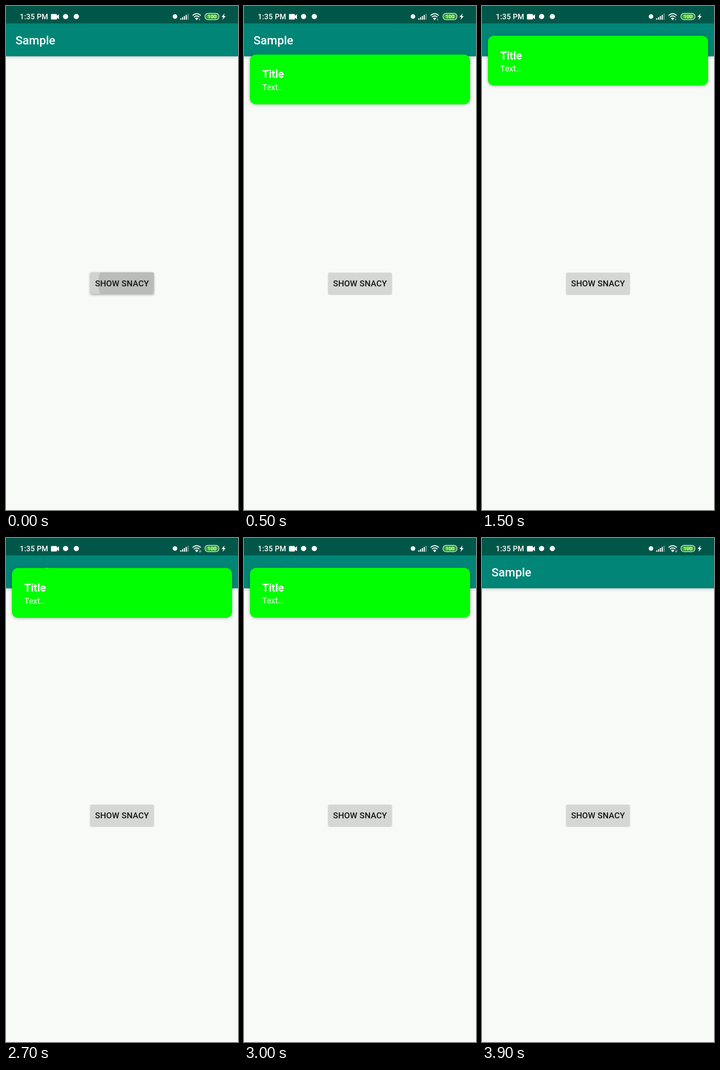
An HTML page for the animation above (5 s loop, 508 by 1102 pixels).

```html
<!DOCTYPE html>
<html lang="en">
<head>
<meta charset="utf-8">
<title>Snackbar sample</title>
<style>
  html, body { margin: 0; width: 100%; height: 100%; overflow: hidden; background: #f8faf7; }
  svg { display: block; width: 508px; height: 1102px; font-family: Roboto, sans-serif; }
  #bar { filter: drop-shadow(0 2px 3px rgba(0, 0, 0, .2)); }
  #card { filter: drop-shadow(0 1.5px 3px rgba(0, 0, 0, .3)); }
  .medium { font-weight: 500; }
</style>
</head>
<body>
<svg viewBox="0 0 508 1102">
  <defs>
    <clipPath id="face"><rect x="184.5" y="583" width="139" height="47" rx="2.5"/></clipPath>
  </defs>
  <rect width="508" height="1102" fill="#f8faf7"/>

  <g id="bar"><rect width="508" height="110" fill="#008577"/></g>
  <rect width="508" height="38" fill="#005749"/>
  <text class="medium" x="20.7" y="84" font-size="25.9" fill="#fff">Sample</text>

  <g id="button">
    <rect id="plate" x="184.5" y="583" width="139" height="47" rx="2.5" fill="#d5d7d5"/>
    <g clip-path="url(#face)">
      <rect id="tint" x="184" y="582" width="140" height="49"/>
      <circle id="ripple" cx="272" cy="606"/>
    </g>
  </g>
  <text class="medium" x="254" y="613" font-size="18.3" letter-spacing=".15"
        text-anchor="middle" fill="#131414">SHOW SNACY</text>

  <g id="card" fill="#fff">
    <rect x="13" width="482" height="109" rx="13" fill="#0f0"/>
    <text x="40" y="51.5" font-size="23.3" font-weight="700">Title</text>
    <text x="40" y="78" font-size="18.1">Text...</text>
  </g>

  <!-- status icons stay above the card -->
  <g fill="#fff">
    <text class="medium" x="30.3" y="29.3" font-size="16.2" letter-spacing=".25">1:35 PM</text>
    <path d="M100 17.5h10q1.5 0 1.5 1.5v2.6l4.5-3.6v11l-4.5-3.6v2.6q0 1.500-1.500 1.500h-10q-1.500 0-1.500-1.500v-9q0-1.500 1.500-1.500z"/>
    <circle cx="130.500" cy="23" r="5.800"/>
    <circle cx="154" cy="23" r="5.800"/>
    <circle cx="370" cy="23" r="5"/>
    <g id="signal"></g>
    <g fill="none" stroke="#fff" stroke-width="2">
      <path d="M408.500 20.800q9-8 18 0M411.500 24.200q6-5.200 12 0"/>
    </g>
    <path d="M413.800 26.900q3.700-2.800 7.400 0l-3.700 4.100z"/>
    <g stroke="#fff" stroke-opacity=".75" stroke-width="1.100" fill="none">
      <path id="down" d="M424 27v4.200m-1-1.200l1 1.200"/>
      <path id="up" d="M426.300 31.200v-4.200m1 1.200l-1-1.200"/>
    </g>
    <rect x="435.700" y="16.200" width="30.600" height="13.600" rx="6.500" fill="none" stroke="#fff" stroke-width="1.400"/>
    <rect x="437.700" y="18.200" width="26.600" height="9.600" rx="4.600" fill="#3fb618"/>
    <text class="medium" x="451" y="27.200" font-size="11.500" text-anchor="middle">100</text>
    <path d="M478.700 16l-6.700 8h4l-2 6.500 7-8.500h-4z"/>
  </g>
</svg>

<script>
  const LOOP = 5000, STEP = 100;
  const REST = 65, TRAVEL = 311, TENSION = 2;
  const ENTER = { start: 228, length: 500 };
  const LEAVE = { start: 2687, length: 470 };

  // time, ripple radius, ripple opacity, tint opacity, lift
  const PRESS = [
    [0, 70, .11, .02, 1],
    [100, 100, .09, .02, .8],
    [200, 100, .05, .01, .5],
    [300, 100, .02, 0, .2],
    [400, 100, 0, 0, 0]
  ];
  // time, number of traffic arrows
  const TRAFFIC = [[0, 1], [1700, 0], [1900, 2], [3000, 0], [3300, 2]];

  const get = id => document.getElementById(id);
  const at = (table, t) => table.filter(row => row[0] <= t).pop();
  const phase = (t, { start, length }) => Math.min(1, Math.max(0, (t - start) / length));
  const anticipate = p => p * p * ((TENSION + 1) * p - TENSION);
  const overshoot = p => 1 - anticipate(1 - p);

  function cardTop(t) {
    return t < LEAVE.start
      ? REST - TRAVEL * (1 - overshoot(phase(t, ENTER)))
      : REST - TRAVEL * anticipate(phase(t, LEAVE));
  }

  function draw(t) {
    get('card').setAttribute('transform', `translate(0 ${cardTop(t).toFixed(1)})`);

    const [, radius, dark, tint, lift] = at(PRESS, t);
    get('ripple').setAttribute('r', radius);
    get('ripple').setAttribute('opacity', dark);
    get('tint').setAttribute('opacity', tint);
    get('button').setAttribute('transform', `translate(0 ${-.7 * lift})`);
    get('plate').style.filter =
      `drop-shadow(0 ${1 + 1.5 * lift}px ${1.2 + 1.3 * lift}px rgba(0, 0, 0, ${.25 + .1 * lift}))`;

    const arrows = at(TRAFFIC, t)[1];
    get('down').setAttribute('opacity', arrows > 0 ? 1 : 0);
    get('up').setAttribute('opacity', arrows > 1 ? 1 : 0);
  }

  get('signal').innerHTML = [0, 1, 2, 3, 4].map(i => {
    const h = 3 + 2.5 * i;
    return `<rect x="${381.5 + 4 * i}" y="${30 - h}" width="2.4" height="${h}" opacity="${i < 4 ? 1 : .4}"/>`;
  }).join('');

  const begin = performance.now();
  function tick() {
    const t = (performance.now() - begin) % LOOP;
    draw(Math.floor(t / STEP) * STEP);
    requestAnimationFrame(tick);
  }
  tick();
</script>
</body>
</html>
```
